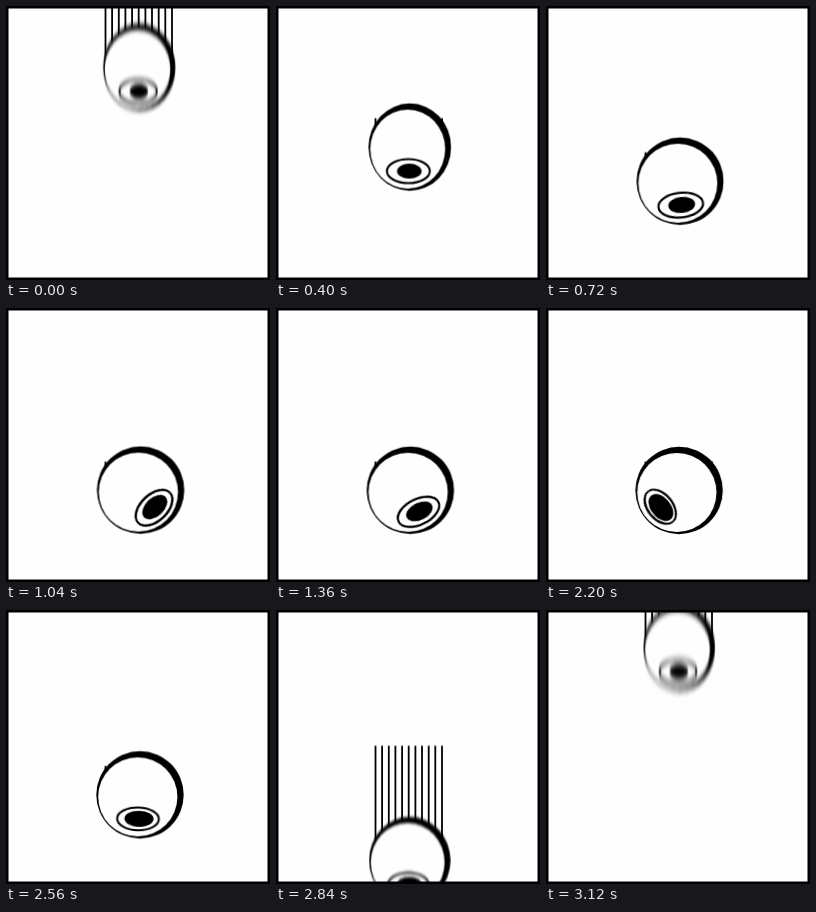
Recreate the animation shown at these times as an HTML page without scripts. Size 264x274 px, loop 3160 ms.

```html
<!DOCTYPE html>
<html lang="en">
<head>
<meta charset="utf-8">
<title>Falling eye</title>
<style>
  html, body { margin: 0; width: 100%; height: 100%; overflow: hidden; background: #fefefe; }
  svg { display: block; width: 100vw; height: 100vh; }
  g, ellipse { animation: 3160ms linear infinite; }

  .fall { animation-name: fall; }
  .lines { animation-name: lines; transform-origin: 133px 182px; stroke: #000; stroke-width: 1.8; }
  .stretch { animation-name: stretch; transform-origin: 130px 182px; }
  .sway { animation-name: sway; animation-timing-function: ease-in-out; }
  .roll { animation-name: roll; animation-timing-function: ease-in-out; transform-origin: 132px 184.5px; }
  .ring { animation-name: ring; transform-origin: 132.5px 206.5px; fill: #fefefe; stroke: #000; stroke-width: 2.2; }
  .pupil { animation-name: pupil; transform-origin: 133.5px 206.5px; }

  /* drops in, settles, then leaves below and wraps to the top */
  @keyframes fall {
    0%, 100% { transform: translateY(-121.5px); }
    1.27% { transform: translateY(-105px); }
    2.53% { transform: translateY(-93px); }
    3.8% { transform: translateY(-84px); }
    5.06% { transform: translateY(-76px); }
    7.6% { transform: translateY(-63px); }
    12.66% { transform: translateY(-41.5px); }
    17.72% { transform: translateY(-22.5px); }
    20.25% { transform: translateY(-14px); }
    24.05% { transform: translateY(-4px); }
    28.5%, 77.2% { transform: none; }
    81.01% { transform: translateY(2.3px); }
    83.54% { transform: translateY(7px); }
    86.08% { transform: translateY(18px); }
    88.61% { transform: translateY(47px); }
    91.14% { transform: translateY(88px); }
    94.3% { transform: translateY(148px); }
    94.31% { transform: translateY(-228px); }
    98.73% { transform: translateY(-145.5px); }
  }
  @keyframes lines {
    0%, 100% { transform: none; }
    1.27% { transform: scaleY(.85); }
    5.06%, 86.08% { transform: scaleY(.2); }
    91.14%, 98.73% { transform: none; }
  }
  @keyframes stretch {
    0%, 100% { transform: scaleX(.828); }
    5.06% { transform: scaleX(.88); }
    12.66% { transform: scaleX(.945); }
    17.72% { transform: scaleX(.98); }
    24.05%, 86.08% { transform: none; }
    88.61% { transform: scaleX(.97); }
    93.67%, 98.73% { transform: scaleX(.82); }
  }
  /* looks right, ahead, left, ahead */
  @keyframes roll {
    0%, 18.99%, 49.4%, 53.2%, 82.3%, 100% { transform: none; }
    34.2%, 38% { transform: rotate(-44deg); }
    67.1%, 70.9% { transform: rotate(51deg); }
  }
  @keyframes sway {
    0%, 18.99%, 49.4%, 53.2%, 82.3%, 100% { transform: none; }
    34.2%, 38% { transform: translate(.6px, -.4px); }
    67.1%, 70.9% { transform: translateX(-.9px); }
  }
  @keyframes ring {
    0%, 18.99%, 49.4%, 53.2%, 100% { transform: none; }
    34.2%, 38% { transform: scale(.96, 1.12); }
    67.1%, 70.9% { transform: scale(.86, 1.04); }
    81% { transform: scale(.92, .95); }
  }
  @keyframes pupil {
    0%, 100% { transform: scaleX(.86); }
    12.66%, 18.99%, 49.4%, 53.2% { transform: none; }
    34.2%, 38% { transform: scale(1.15, 1.26); }
    67.1%, 70.9% { transform: scale(1.18, 1.3); }
    81% { transform: scale(1.12, 1.08); }
  }
</style>
</head>
<body>
<svg viewBox="0 0 264 274" preserveAspectRatio="none">
  <filter id="blur" filterUnits="userSpaceOnUse" x="0" y="-120" width="264" height="520" color-interpolation-filters="sRGB">
    <feGaussianBlur stdDeviation="0 0">
      <animate attributeName="stdDeviation" dur="3160ms" repeatCount="indefinite"
        keyTimes="0;.0127;.038;.1266;.1772;.2532;.8354;.8861;.9367;.9873;1"
        values="0 2.6;0 2;0 1.1;0 .5;0 .4;0 0;0 0;0 1.4;0 3;0 3.3;0 2.6"/>
    </feGaussianBlur>
  </filter>

  <g class="fall">
    <g class="lines">
      <path d="M99.5 40V182M106.1 40V182M112.8 40V182M119.4 40V182M126.1 40V182M132.7 40V182M139.4 40V182M146 40V182M152.7 40V182M159.3 40V182M166 40V182"/>
    </g>
  </g>
  <g filter="url(#blur)">
    <g class="fall">
      <g class="stretch">
        <g class="sway">
          <circle cx="134" cy="182.5" r="43.7"/>
          <circle cx="131.8" cy="184.5" r="39.6" fill="#fefefe"/>
          <g class="roll">
            <ellipse class="ring" cx="132.5" cy="206.5" rx="22.7" ry="12"/>
            <ellipse class="pupil" cx="133.5" cy="206.5" rx="13" ry="7.5"/>
          </g>
        </g>
      </g>
    </g>
  </g>
  <rect x="1.25" y="1.25" width="261.5" height="271.5" fill="none" stroke="#000" stroke-width="2.5"/>
</svg>
</body>
</html>
```
